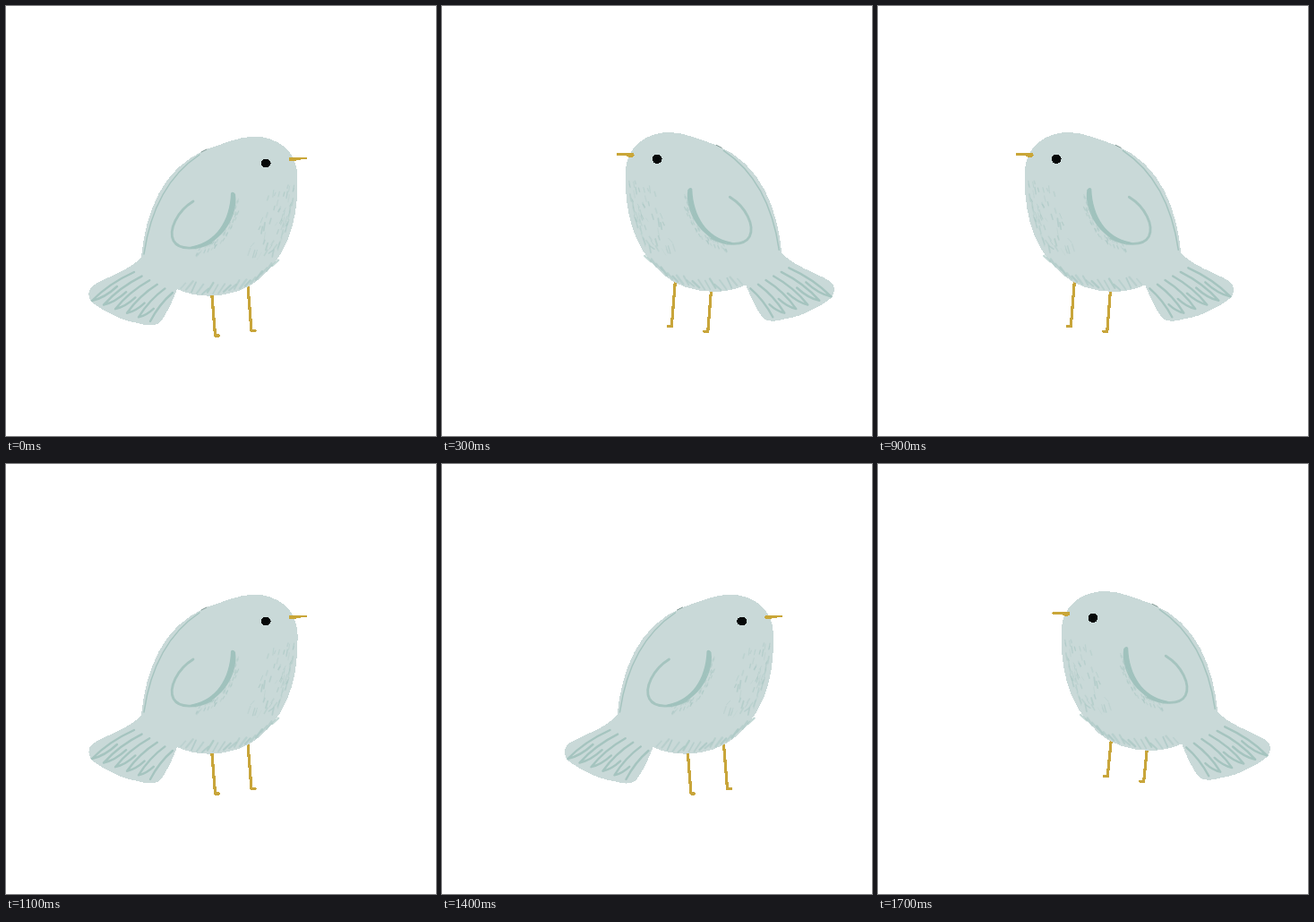
Animation, 480 px wide and 480 px high, one loop 1.8 s. Source, as an HTML page:

```html
<!DOCTYPE html>
<html lang="en">
<head>
<meta charset="utf-8">
<title>Hopping bird</title>
<style>
  html, body { margin: 0; width: 100%; height: 100%; overflow: hidden; background: #fff; }
  svg { display: block; width: 100%; height: 100%; }
  .crisp { shape-rendering: crispEdges; }
</style>
</head>
<body>
<svg viewBox="0 0 480 480" fill="none" stroke-linecap="round" stroke-linejoin="round">
  <g id="bird">
    <path id="legs" class="crisp" stroke="#c8a53a"/>
    <path class="crisp" fill="#c9d9d8" d="M224 160C242 154 259 146 277 145.5C302 146 325 161 325.5 190
      C326 222 323 270 284 304C262 324 220 330 191 316C186 330 177 348 171 354Q163 359 147 354
      Q130 351 120 345Q106 339 95 330Q89 319 97 312C113 302 139 295 151 280C156 232 173 181 224 160Z"/>
    <g stroke="#a5c4bf">
      <path stroke-width="1.5" d="M216 166C180 190 161 228 154 277"/>
      <path id="tail" stroke-width="2.4"/>
      <path stroke-width="2.8" d="M209 218C191 229 181 250 187 262C193 273 213 272 229 264"/>
    </g>
    <path fill="#a0c2bd" d="M251 209Q253 206 256 210C260 236 238 270 206 271Q205 269 209 268C234 263 250 240 251 209Z"/>
    <g id="marks" stroke="#a9c7c3"></g>
    <path stroke="#829995" d="M218 163L224 160"/>
    <g class="crisp" stroke="#c9a638">
      <path stroke-width="4.6" d="M318 171h4"/>
      <path stroke-width="2.6" d="M322 170.5L334.5 170"/>
    </g>
    <ellipse id="open" class="crisp" cx="290.2" cy="175.5" rx="5.5" ry="5" fill="#050808"/>
    <path id="shut" d="M285 174.2h10.6v3.4h-10.6z" fill="#050808"/>
  </g>
</svg>
<script>
const $ = id => document.getElementById(id);
const mix = (a, b, t) => a + (b - a) * t;

// Tail feathers: a fan of narrow loops
let feathers = '';
for (let i = 0; i < 6; i++) {
  const t = i / 5, fold = 1 - t * 0.5;
  const x = mix(143, 186, t), y = mix(297, 320, t);
  const tipX = mix(96, 161, t), tipY = mix(329, 352, t);
  feathers += `M${x} ${y}Q${mix(x, tipX, 0.6)} ${mix(y, tipY, 0.4)} ${tipX} ${tipY}`;
  if (i < 5) feathers += `q${14 * fold} ${-3 * fold} ${28 * fold} ${-16 * fold}`;
}
$('tail').setAttribute('d', feathers);

// Brush marks on breast, belly and beside the wing
let seed = 11;
const rnd = () => (seed = seed * 16807 % 2147483647) / 2147483647;
let marks = '';
const mark = (x, y, dx, dy, w, alpha) => {
  marks += `<path d="M${x} ${y}l${dx} ${dy}" stroke-width="${w}" opacity="${alpha}"/>`;
};
for (let i = 0; i < 60; i++) {
  const t = rnd(), x = 321.5 - 22 * t * t - 30 * rnd() ** 1.9;
  mark(x, 200 + 76 * t, -1 - 4 * t * rnd(), 3 + 6 * rnd(), 0.8 + rnd(), 0.2 + 0.5 * rnd());
}
for (let i = 0; i < 18; i++) {
  const t = i / 17, y = 315 + 24 * t * (1 - t) - 26 * t ** 3;
  mark(195 + 102 * t, y + 3 * rnd(), 5 + 3 * rnd(), -6 - 5 * rnd(), 1.5 + rnd(), 0.4 + 0.4 * rnd());
}
for (let i = 0; i < 46; i++) {
  const a = 1.5 * rnd(), r = 1 + 0.14 * rnd();
  mark(208 + 47 * r * Math.cos(a), 212 + 57 * r * Math.sin(a),
    -1 - rnd(), 2 + 2 * rnd(), 1.2, 0.25 + 0.4 * rnd());
}
$('marks').innerHTML = marks;

const hops = [
  { at: 0, left: false, from: 0, to: 44.5, steps: 2, height: 22 },
  { at: 3, left: true, from: 41, to: 0, steps: 2, height: 17 },
  { at: 11, left: false, from: 0, to: 44.5, steps: 3, height: 34 },
  { at: 16, left: true, from: 61, to: 26, steps: 2, height: -1 }
];

const leg = (x, y, tuck) => `M${x} ${y}l4 ${50 - tuck}h4`;

function draw(ms) {
  const step = Math.floor(ms % 1800 / 100);
  const hop = hops.findLast(h => h.at <= step);
  const u = Math.min(1, (step - hop.at) / hop.steps);
  const x = mix(hop.from, hop.to, u ** 0.8);
  const y = -4 * hop.height * u * (1 - u);
  const tuck = u > 0 && u < 1 ? 10 : 0;
  const shut = y < -5 || step === 6 || step === 8;

  $('bird').setAttribute('transform', hop.left
    ? `translate(${489.3 + x} ${y - 4.7}) scale(-1 1)`
    : `translate(${x} ${y})`);
  $('legs').setAttribute('d', leg(229.5, 318, tuck) + leg(270, 312.5, tuck));
  $('legs').setAttribute('stroke-width', 3.2);
  $('open').style.display = shut ? 'none' : '';
  $('shut').style.display = shut ? '' : 'none';
}

const start = performance.now();
function tick() {
  draw(performance.now() - start);
  requestAnimationFrame(tick);
}
tick();
</script>
</body>
</html>
```
